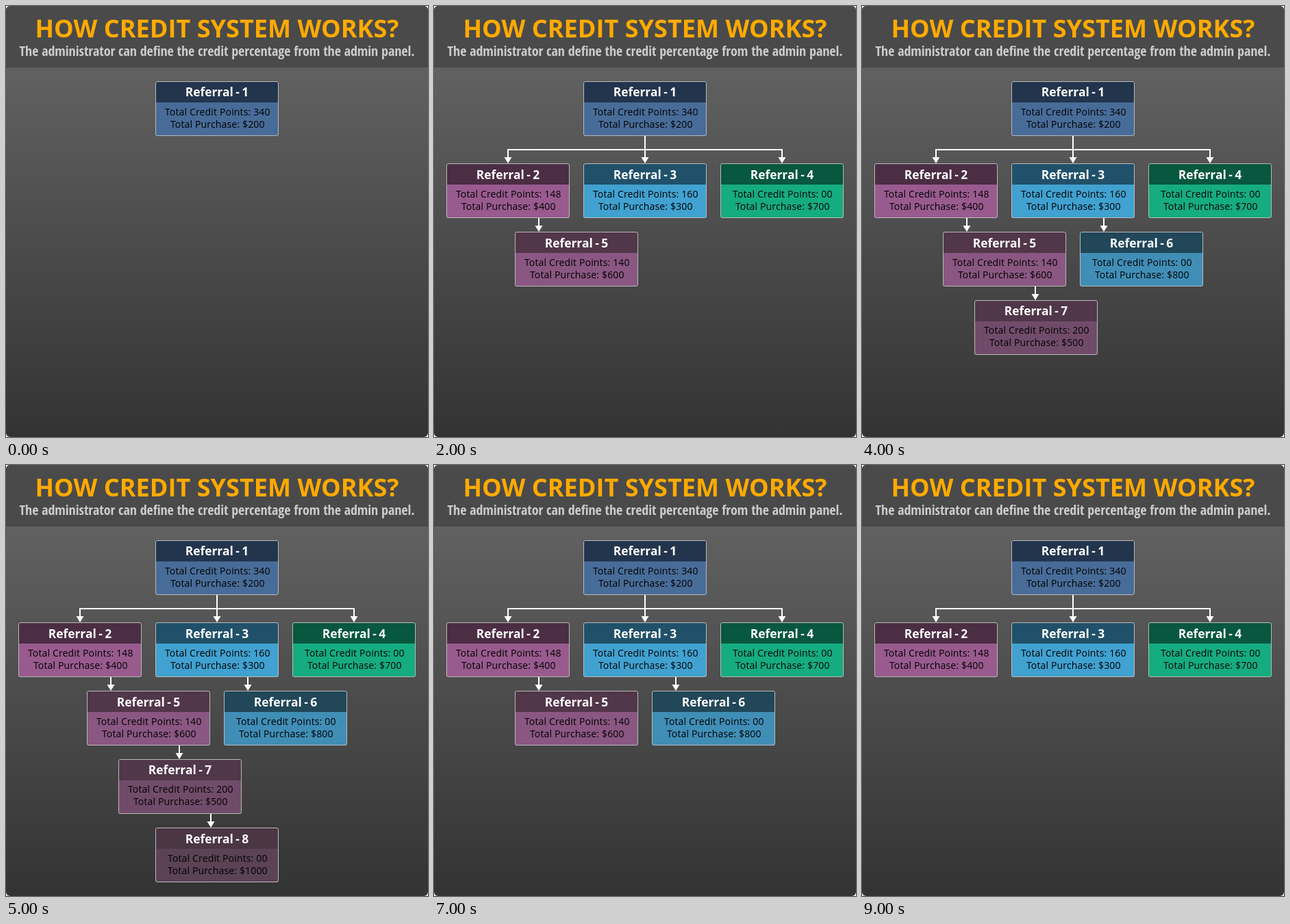
An HTML page that plays this animation: 616x630 px, repeating every 10000 ms.

```html
<!DOCTYPE html>
<html lang="en">
<head>
<meta charset="utf-8">
<title>How credit system works</title>
<style>
  html, body { margin: 0; width: 100%; height: 100%; overflow: hidden; background: #fff; }
  svg { display: block; width: 616px; height: 630px; }
  text { font-family: "Open Sans", sans-serif; text-anchor: middle; }
  .title { font-size: 36.1px; font-weight: 700; fill: #fa0; }
  .subtitle { font-size: 20px; font-weight: 700; font-stretch: 75%; letter-spacing: -.055px; fill: #ccc; }
  .name { font-size: 17.4px; font-weight: 700; word-spacing: -1px; fill: #fff; }
  .info { font-size: 14px; letter-spacing: .16px; fill: #000; }
  .line { fill: none; stroke: #fff; stroke-width: 2; }
  .head { fill: #fff; }
</style>
</head>
<body>
<svg viewBox="0 0 616 630">
  <defs>
    <linearGradient id="page" gradientUnits="userSpaceOnUse" x1="0" y1="90" x2="0" y2="630">
      <stop offset="0" stop-color="#616161"/>
      <stop offset="1" stop-color="#333"/>
    </linearGradient>
    <clipPath id="round"><rect width="616" height="630" rx="6"/></clipPath>
  </defs>
  <g clip-path="url(#round)">
    <rect width="616" height="630" fill="url(#page)"/>
    <rect width="616" height="90" fill="#4a4a4a"/>
  </g>
  <text class="title" x="308" y="46">HOW CREDIT SYSTEM WORKS?</text>
  <text class="subtitle" x="308" y="73">The administrator can define the credit percentage from the admin panel.</text>
  <g id="tree"></g>
</svg>
<script>
const STEP = 1000;
const VISIBLE = [1, 4, 5, 6, 7, 8, 7, 6, 5, 4];

// nameY and infoY are baselines measured from the top of the card
const cards = [
  { x: 218, y: 110, points: '340', spent: 200, top: '#23354d', body: '#486c98', nameY: 22 },
  { x: 18, y: 230, points: '148', spent: 400, top: '#4b2d44', body: '#995b8e' },
  { x: 218, y: 230, points: '160', spent: 300, top: '#21516a', body: '#41a1d0' },
  { x: 418, y: 230, points: '00', spent: 700, top: '#08573f', body: '#15ac80' },
  { x: 118, y: 330, points: '140', spent: 600, top: '#523649', body: '#8a5782', from: 153 },
  { x: 318, y: 330, points: '00', spent: 800, top: '#214759', body: '#408eb6', from: 353 },
  { x: 164, y: 430, points: '200', spent: 500, top: '#503749', body: '#714c6a', from: 253, nameY: 22, infoY: 49 },
  { x: 218, y: 530, points: '00', spent: 1000, top: '#4b3645', body: '#5b4355', from: 299 }
];

const arrow = (x, y) =>
  `<path class="line" d="M${x} ${y - 20}V${y - 7}"/>` +
  `<path class="head" d="M${x - 5.5} ${y - 9}h11l-5.5 9z"/>`;

function drawCard({ x, y, points, spent, top, body, from, nameY = 23, infoY = 50 }, i) {
  const mid = x + 90;
  let links = '';
  if (from) links = arrow(from, y);
  else if (i) links = arrow(mid, y);
  if (i === 1) links += '<path class="line" d="M308 190v20M107 210h402"/>';
  return `<g>${links}
    <rect x="${x}" y="${y}" width="180" height="80" rx="3" fill="${body}"/>
    <path d="M${x} ${y + 31}v-28q0-3 3-3h174q3 0 3 3v28z" fill="${top}"/>
    <rect x="${x + .5}" y="${y + .5}" width="179" height="79" rx="2.5" fill="none" stroke="#b9b9b9"/>
    <text class="name" x="${mid}" y="${y + nameY}">Referral - ${i + 1}</text>
    <text class="info" x="${mid + .8}" y="${y + infoY}">Total Credit Points: ${points}</text>
    <text class="info" x="${mid + .8}" y="${y + infoY + 18}">Total Purchase: $${spent}</text>
  </g>`;
}

const tree = document.getElementById('tree');
tree.innerHTML = cards.map(drawCard).join('');
const groups = [...tree.children];

// Take the first family that offers a condensed face
const subtitle = document.querySelector('.subtitle');
for (const family of ['Open Sans Condensed', 'Open Sans', 'Noto Sans', 'Roboto Condensed', 'Roboto']) {
  subtitle.style.fontFamily = `"${family}", sans-serif`;
  if (subtitle.getComputedTextLength() < 610) break;
}

const start = performance.now();
function render() {
  const elapsed = Math.max(0, performance.now() - start);
  const count = VISIBLE[Math.floor(elapsed / STEP) % VISIBLE.length];
  groups.forEach((group, i) => { group.style.display = i < count ? '' : 'none'; });
  requestAnimationFrame(render);
}
render();
</script>
</body>
</html>
```
